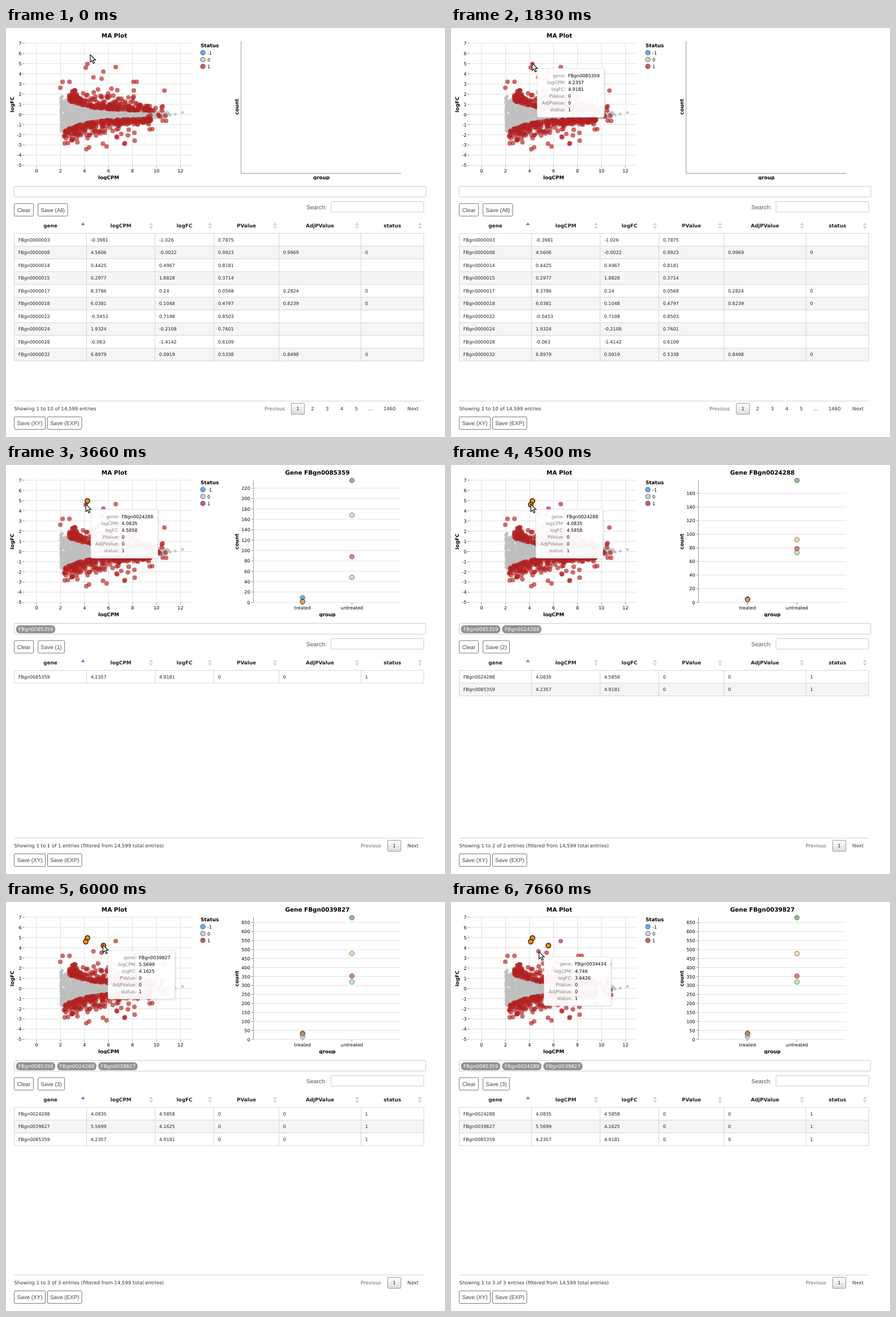
Write an HTML page that moves like this. It is 776 px wide and 722 px high and loops after 8 s.

```html
<!DOCTYPE html>
<html lang="en">
<head>
<meta charset="utf-8">
<title>MA Plot</title>
<style>
html, body { margin: 0; width: 100%; height: 100%; overflow: hidden; background: #fff; }
svg { display: block; width: 776px; height: 722px; font-family: "DejaVu Sans", sans-serif; text-rendering: geometricPrecision; }
.ui { font-family: "Liberation Sans", Arial, sans-serif; }
.b { font-weight: bold; }
.m { text-anchor: middle; }
.e { text-anchor: end; }
.tip { fill: #fff; fill-opacity: .95; stroke: #e0e0e0; stroke-width: .8; filter: drop-shadow(1.6px 1.6px 1.8px rgba(0,0,0,.13)); }
</style>
</head>
<body>
<svg id="stage" viewBox="0 0 776 722" xmlns="http://www.w3.org/2000/svg"></svg>
<script>
const LOOP = 8000, TICKS = 48;

const text = (x, y, s, size, cls = '', fill = '#000', extra = '') =>
  `<text x="${x}" y="${y}" font-size="${size}" class="${cls}" fill="${fill}" ${extra}>${s}</text>`;
const line = (x1, y1, x2, y2, color) =>
  `<path d="M${x1} ${y1}L${x2} ${y2}" stroke="${color}" stroke-width=".9"/>`;
const rect = (x, y, w, h, fill, stroke = 'none', r = 0) =>
  `<rect x="${x}" y="${y}" width="${w}" height="${h}" rx="${r}" fill="${fill}" stroke="${stroke}"/>`;
const dot = (x, y, r, fill, extra = '') =>
  `<circle cx="${x.toFixed(1)}" cy="${y.toFixed(1)}" r="${r}" fill="${fill}" ${extra}/>`;
const upright = (x, y, s) =>
  text(0, 0, s, 8.8, 'b m', '#000', `transform="translate(${x} ${y}) rotate(-90)"`);
const range = (n, f) => Array.from({ length: n }, (_, i) => f(i)).join('');
const button = (x, y, w, s) =>
  rect(x, y, w, 22, '#fff', '#777', 1.6) + text(x + w / 2, y + 14.6, s, 9.9, 'ui m', '#444');

let seed = 7;
const rnd = () => {
  seed = (seed * 1664525 + 1013904223) % 4294967296;
  return seed / 4294967296;
};
const expo = scale => -Math.log(1 - rnd()) * scale;

// Scatter plot
const MID = 152.6;
const px = v => 54 + 21.2 * v;
const py = v => MID - 17.96 * v;
const spread = x => 5 + 27 * Math.exp(-(x - 96) / 40);
const grey = (x, y) => dot(x, y, 2.6, '#c0c0c0', 'opacity=".8"');
const red = (x, y) => dot(x, y, 4.1, '#b22222', 'opacity=".66"');

// The most isolated points
const extremes = [[194, 69], [169, 89.5], [154.5, 87], [100, 95], [96, 105.5], [231, 95],
  [280, 110.5], [142, 214], [209.5, 204.5], [109.5, 203], [258.5, 178.5], [283, 164]];

function greyDot() {
  const x = 97 + 185 * rnd() ** 1.5;
  return grey(x, 153 + spread(x) * (rnd() * 2 - 1) * (.85 + .25 * rnd()));
}

// Dense next to the grey band, thinning outwards
function redDot(i) {
  const up = i % 2, x0 = up ? 112 : 102;
  const x = x0 + (257 - x0) * rnd() ** 1.1;
  const d = spread(x) + 1.5 + Math.min(22, expo(8 - (x - 100) * .03));
  return red(x, 153 + (up ? -d : d));
}

function strayDot(i) {
  const d = 28 + Math.min(30, expo(10));
  return red(108 + 125 * rnd(), 153 + (i % 2 ? -d : d));
}

function scatter() {
  let s = text(191.5, 17, 'MA Plot', 10.4, 'b m');
  for (let v = 0; v <= 12; v += 2)
    s += line(px(v), 27, px(v), 242.5, '#ddd') + line(px(v), 242.5, px(v), 246.5, '#888') +
      text(px(v), 255.3, v, 8, 'm');
  for (let v = -5; v <= 7; v++)
    s += line(33, py(v), 329, py(v), '#ddd') + line(29, py(v), 33, py(v), '#888') +
      text(27.5, py(v) + 3, v, 8, 'e');
  s += upright(14, 135, 'logFC') + text(181.5, 267, 'logCPM', 8.8, 'b m');
  s += range(1600, greyDot) + range(470, redDot);
  s += range(30, () => grey(258 + 36 * rnd(), 152 + 10 * (rnd() - .5))) + grey(312, 149) + grey(299, 152);
  s += range(14, () => red(248 + 34 * rnd(), 150 + 28 * (rnd() - .5))) + range(44, strayDot);
  s += [...extremes, ...genes.slice(0, 3).map(g => g.at)].map(p => red(...p)).join('');
  s += text(344, 34, 'Status', 8.8, 'b');
  [['-1', '#1e90ff'], ['0', '#c0c0c0'], ['1', '#b22222']].forEach(([label, color], i) => {
    const y = 43.6 + 12.1 * i;
    s += dot(348, y, 4.1, color, 'stroke="#000" stroke-width=".8" opacity=".72"') + text(356, y + 3, label, 8);
  });
  return s;
}

// Expression plot
const hues = ['#1f77b4', '#aec7e8', '#ff7f0e', '#ffbb78', '#2ca02c', '#98df8a', '#d62728'];

function emptyChart() {
  return line(415.5, 23, 415.5, 256.5, '#888') + line(415.5, 256.5, 698.5, 256.5, '#888') +
    upright(411, 139, 'count') + text(557.5, 267, 'group', 8.8, 'b m');
}

function countChart({ id, scale, step, counts }) {
  const y = v => 242.5 - v * scale;
  let s = text(550.5, 17, 'Gene ' + id, 10.4, 'b m') + line(437.5, 27, 437.5, 242.5, '#888');
  for (let v = 0; y(v) > 27; v += step)
    s += line(437.5, y(v), 698.5, y(v), '#ddd') + line(433.5, y(v), 437.5, y(v), '#888') +
      text(431.5, y(v) + 3, v, 8, 'e');
  [['treated', 524.2], ['untreated', 611.5]].forEach(([label, x]) => {
    s += line(x, 242.5, x, 246.5, '#888') + text(x, 255.3, label, 8, 'm');
  });
  s += counts.map((c, i) => dot(i < 3 ? 524.2 : 611.5, y(c), 4.2, hues[i],
    'stroke="#000" stroke-width=".9" opacity=".6"')).join('');
  return s + upright(411, 135, 'count') + text(568, 267, 'group', 8.8, 'b m');
}

// Table
const edges = [14.5, 142.5, 263.5, 367.5, 482.5, 627.5, 738.5];
const heads = ['gene', 'logCPM', 'logFC', 'PValue', 'AdjPValue', 'status'];

const genes = [
  { id: 'FBgn0085359', cpm: '4.2357', fc: '4.9181', at: [144, 63.5], scale: .916, step: 20, counts: [9, 2, 1, 168, 235, 48, 88] },
  { id: 'FBgn0024288', cpm: '4.0835', fc: '4.5858', at: [141, 70], scale: 1.203, step: 20, counts: [5, 4, 4, 92, 179, 73, 79] },
  { id: 'FBgn0039827', cpm: '5.5699', fc: '4.1625', at: [172.2, 77], scale: .317, step: 50, counts: [35, 15, 30, 478, 678, 320, 353] },
  { id: 'FBgn0034434', cpm: '4.746', fc: '3.6426' }
];

const allRows = `FBgn0000003|-0.3981|-1.026|0.7875
FBgn0000008|4.5606|-0.0022|0.9923|0.9969|0
FBgn0000014|0.4425|0.4967|0.8181
FBgn0000015|0.2977|1.8828|0.3714
FBgn0000017|8.3786|0.24|0.0568|0.2824|0
FBgn0000018|6.0381|0.1048|0.4797|0.8239|0
FBgn0000022|-0.5453|0.7198|0.8503
FBgn0000024|1.9324|-0.2108|0.7601
FBgn0000028|-0.063|-1.4142|0.6109
FBgn0000032|6.8979|0.0919|0.5338|0.8498|0`.split('\n').map(r => r.split('|'));

function tableHead() {
  const tri = (x, y, d, color) => `<path d="M${x - 3.5} ${y}h7l-3.5 ${d}z" fill="${color}"/>`;
  return heads.map((s, i) => {
    const x = edges[i + 1] - 7;
    return text((edges[i] + edges[i + 1]) / 2, 352, s, 8.8, 'b m', '#222') +
      (i ? tri(x, 348, -4.8, '#d3d3d3') + tri(x, 350, 4.8, '#d3d3d3') : tri(x + .5, 348, -5, '#6f7bdc'));
  }).join('');
}

function tableBody(rows) {
  const top = 362.5, h = 22.53, bottom = top + h * rows.length;
  let s = '';
  rows.forEach((row, i) => {
    const y = top + h * i;
    if (i % 2) s += rect(14.5, y, 724, h, '#f5f5f5');
    s += line(14.5, y, 738.5, y, '#d2d2d2');
    row.forEach((cell, c) => s += text(edges[c] + 7.2, y + 14.1, cell, 8, '', '#222'));
  });
  s += line(14.5, bottom, 738.5, bottom, '#d2d2d2');
  return s + edges.map(x => line(x, top, x, bottom, '#d2d2d2')).join('');
}

function pager(info, prevX, firstX) {
  const label = (x, s, fill = '#333') => text(x, 675.3, s, 8.53, 'm', fill);
  return text(14.5, 675, info, 8.54, '', '#333') + label(prevX, 'Previous', '#666') +
    rect(firstX - 11.7, 662.5, 23.4, 19.5, 'url(#page)', '#979797', 1.6) +
    label(firstX, 1) + label(719.5, 'Next');
}

function pageLinks() {
  return ['2', '3', '4', '5', '…', '1460'].map((s, i) =>
    text(i < 5 ? 542 + 25.7 * i : 678, 675.3, s, 8.53, 'm', '#333')).join('');
}

// One scene per number of picked genes
function scene(n) {
  if (!n)
    return emptyChart() + button(56.5, 310, 52.5, 'Save (All)') + tableBody(allRows) +
      pager('Showing 1 to 10 of 14,599 entries', 475, 516) + pageLinks();
  const picked = genes.slice(0, n);
  const rows = picked.map(g => [g.id, g.cpm, g.fc, 0, 0, 1]).sort((a, b) => a[0] < b[0] ? -1 : 1);
  return countChart(picked[n - 1]) + button(56.5, 310, 47, `Save (${n})`) +
    picked.map(g => dot(...g.at, 4.2, '#ff8c00', 'stroke="#000" stroke-width="1.2"')).join('') +
    picked.map((g, i) => rect(17.7 + 72.8 * i, 283, 69.3, 14, '#919191', 'none', 6) +
      text(22 + 72.8 * i, 293.3, g.id, 8.8, '', '#fff')).join('') +
    tableBody(rows) +
    pager(`Showing 1 to ${n} of ${n} entries (filtered from 14,599 total entries)`, 645, 686.3);
}

function tooltip(g) {
  const rows = [['gene', g.id], ['logCPM', g.cpm], ['logFC', g.fc], ['PValue', 0], ['AdjPValue', 0], ['status', 1]];
  return '<rect class="tip" width="118.3" height="86" rx="2.4"/>' + rows.map(([k, v], i) =>
    text(50.2, 15.4 + 12.1 * i, k + ':', 8, 'e', '#808080') + text(54.4, 15.4 + 12.1 * i, v, 8)).join('');
}

const chrome = rect(14.5, 279.5, 727.5, 19, '#fff', '#ccc', 1) + button(14.5, 310, 34, 'Clear') +
  text(530.8, 320, 'Search:', 10.4, 'ui', '#555') + rect(574.5, 306.5, 164, 18.5, '#fff', '#ccc', 1) +
  tableHead() + line(14.5, 658.5, 738.5, 658.5, '#ccc') +
  button(14.5, 686.5, 55, 'Save (XY)') + button(73.5, 686.5, 60.5, 'Save (EXP)');

const stage = document.getElementById('stage');
stage.innerHTML = `<defs>
  <linearGradient id="page" x2="0" y2="1"><stop stop-color="#fff"/><stop offset="1" stop-color="#dcdcdc"/></linearGradient>
  <clipPath id="charts"><path d="M0 0H776V268H0Z M0 270H776V722H0Z"/></clipPath>
</defs>
<g clip-path="url(#charts)">${scatter()}${chrome}
${range(4, i => `<g class="scene">${scene(i)}</g>`)}</g>
${genes.map(g => `<g class="tooltip">${tooltip(g)}</g>`).join('')}
<path id="cursor" d="M0 0V13.2L3 10.4L5.2 15.5L7.4 14.5L5.3 9.5H9.4Z" fill="#fff" stroke="#000" stroke-width="1.1"/>`;

const scenes = [...stage.querySelectorAll('.scene')];
const tips = [...stage.querySelectorAll('.tooltip')];
const cursor = document.getElementById('cursor');

// Timeline in ticks of 1/6 s
const clicks = [13, 25, 33];
const path = [[0, 149, 47], [4, 147, 63], [7, 144, 61.5], [11, 143.5, 62], [16, 142, 66], [22, 141, 69],
  [27, 141, 69], [31, 173.5, 77], [37, 171, 75.5], [41, 158, 89], [44, 155.5, 87.5], [48, 155.5, 87.5]];
const hovers = [[4, 20], [20, 28], [30, 42, 37], [44, 48]]; // start, end, tick it stops following

function pointer(tick) {
  const i = Math.max(1, path.findIndex(p => p[0] >= tick));
  const [t0, x0, y0] = path[i - 1], [t1, x1, y1] = path[i];
  const k = (tick - t0) / (t1 - t0);
  return [x0 + (x1 - x0) * k, y0 + (y1 - y0) * k];
}

const show = (el, on) => el.style.display = on ? '' : 'none';
const move = (el, x, y) => el.setAttribute('transform', `translate(${x} ${y})`);

function draw(ms) {
  const tick = Math.min(TICKS - 1, Math.floor((ms + 7) * 6 / 1000));
  const n = clicks.filter(c => tick >= c).length;
  scenes.forEach((el, i) => show(el, i === n));
  tips.forEach((el, i) => {
    const [from, to, hold = to] = hovers[i];
    const on = tick >= from && tick < to;
    show(el, on);
    if (!on) return;
    const [x, y] = pointer(Math.min(tick, hold));
    move(el, x + 9, y + 9.5);
  });
  move(cursor, ...pointer(tick));
}

const start = performance.now();
function loop() {
  draw((performance.now() - start) % LOOP);
  requestAnimationFrame(loop);
}
loop();
</script>
</body>
</html>
```
